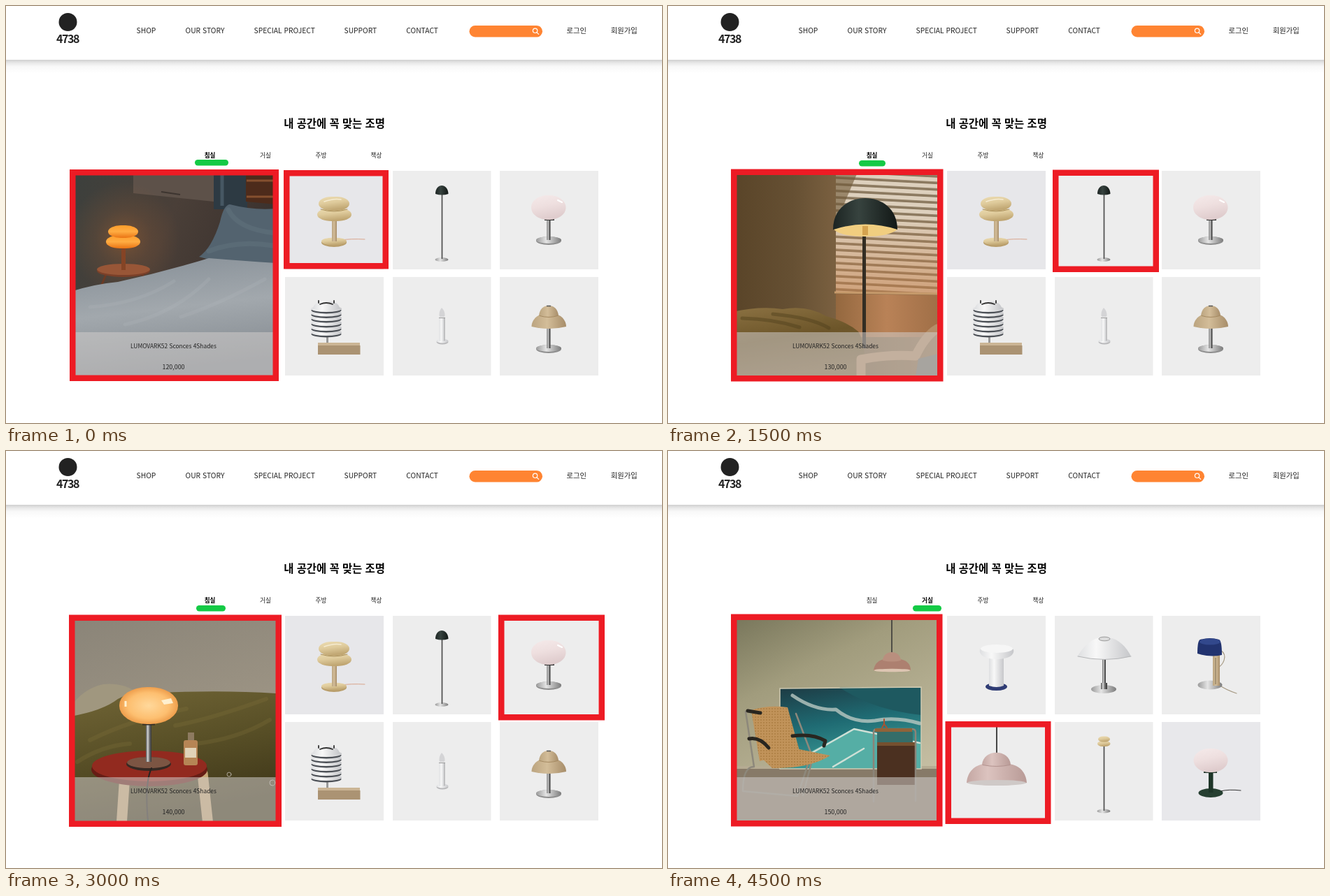
An HTML page for the animation above (6 s loop, 938 by 597 pixels).

```html
<!DOCTYPE html>
<html lang="ko">
<head>
<meta charset="utf-8">
<title>Lighting shop</title>
<style>
html, body { margin: 0; width: 100%; height: 100%; overflow: hidden; background: #fff; }
svg { display: block; width: 100%; height: 100%; }
text { font-family: "Noto Sans CJK KR", "Noto Sans CJK JP", "Noto Sans", sans-serif; fill: #222; }
.nav { font-size: 10.3px; }
.tab { font-size: 8.6px; text-anchor: middle; }
.tab.on { font-weight: 700; fill: #000; }
.mid { text-anchor: middle; }
.line { fill: none; stroke-linecap: round; stroke-linejoin: round; }
</style>
</head>
<body>
<svg viewBox="0 0 938 597">
<defs>
  <linearGradient id="shadow" x2="0" y2="1"><stop stop-color="#cfcfcf"/><stop offset=".25" stop-color="#e9e9e9"/><stop offset=".5" stop-color="#f8f8f8"/><stop offset="1" stop-color="#fff"/></linearGradient>
  <linearGradient id="cream" x2=".3" y2="1"><stop stop-color="#ecdcb2"/><stop offset=".5" stop-color="#dfcb9c"/><stop offset="1" stop-color="#c0a672"/></linearGradient>
  <linearGradient id="white"><stop stop-color="#dedfe1"/><stop offset=".35" stop-color="#f8f8f8"/><stop offset="1" stop-color="#c6c7ca"/></linearGradient>
  <linearGradient id="chrome"><stop stop-color="#555"/><stop offset=".35" stop-color="#d8d8d8"/><stop offset=".6" stop-color="#777"/><stop offset="1" stop-color="#333"/></linearGradient>
  <linearGradient id="plate"><stop stop-color="#9a9a9a"/><stop offset=".4" stop-color="#e4e4e4"/><stop offset=".7" stop-color="#b0b0b0"/><stop offset="1" stop-color="#7c7c7c"/></linearGradient>
  <linearGradient id="pink" x2=".3" y2="1"><stop stop-color="#f5eaea"/><stop offset=".5" stop-color="#eedfdf"/><stop offset="1" stop-color="#dfcccd"/></linearGradient>
  <linearGradient id="rose"><stop stop-color="#c4a7a3"/><stop offset=".35" stop-color="#dcc3bf"/><stop offset="1" stop-color="#b89a96"/></linearGradient>
  <linearGradient id="beige"><stop stop-color="#bba47f"/><stop offset=".45" stop-color="#d3bd99"/><stop offset="1" stop-color="#a78d69"/></linearGradient>
  <linearGradient id="dark"><stop stop-color="#1c2422"/><stop offset=".4" stop-color="#37433f"/><stop offset="1" stop-color="#121816"/></linearGradient>
  <linearGradient id="amber" x2="0" y2="1"><stop stop-color="#ff9d2b"/><stop offset=".5" stop-color="#ffac42"/><stop offset="1" stop-color="#ea7414"/></linearGradient>
  <radialGradient id="glow"><stop stop-color="#e07a2c" stop-opacity=".32"/><stop offset=".5" stop-color="#d07030" stop-opacity=".12"/><stop offset="1" stop-color="#d07030" stop-opacity="0"/></radialGradient>
  <linearGradient id="night" x2="1" y2=".4"><stop stop-color="#3c403d"/><stop offset=".5" stop-color="#4a3f38"/><stop offset="1" stop-color="#382f2c"/></linearGradient>
  <linearGradient id="sheet" x2=".2" y2="1"><stop stop-color="#858e96"/><stop offset=".5" stop-color="#a2a8ad"/><stop offset="1" stop-color="#848a90"/></linearGradient>
  <linearGradient id="brown"><stop stop-color="#594428"/><stop offset=".3" stop-color="#665033"/><stop offset=".5" stop-color="#7a6040"/><stop offset="1" stop-color="#94734e"/></linearGradient>
  <linearGradient id="sill"><stop stop-color="#94683f"/><stop offset=".5" stop-color="#b98257"/><stop offset="1" stop-color="#a06f47"/></linearGradient>
  <linearGradient id="sunset" x2="0" y2="1"><stop offset=".35" stop-color="#c47c45" stop-opacity="0"/><stop offset="1" stop-color="#c47c45" stop-opacity=".55"/></linearGradient>
  <linearGradient id="khaki" x2=".3" y2="1"><stop stop-color="#8b7142"/><stop offset=".5" stop-color="#6c5529"/><stop offset="1" stop-color="#806841"/></linearGradient>
  <linearGradient id="olive" x2=".3" y2="1"><stop stop-color="#716536"/><stop offset=".5" stop-color="#595027"/><stop offset="1" stop-color="#3f3719"/></linearGradient>
  <linearGradient id="gray" x2=".3" y2="1"><stop stop-color="#8a8478"/><stop offset="1" stop-color="#a69c8a"/></linearGradient>
  <radialGradient id="lit"><stop stop-color="#ffd89b"/><stop offset=".7" stop-color="#fdbf70"/><stop offset="1" stop-color="#ef9f4d"/></radialGradient>
  <linearGradient id="sage" x2=".5" y2="1"><stop stop-color="#77755a"/><stop offset=".35" stop-color="#a19c7d"/><stop offset="1" stop-color="#c6bfa4"/></linearGradient>
  <linearGradient id="sea" x2=".3" y2="1"><stop stop-color="#1d3a43"/><stop offset=".5" stop-color="#1f6b73"/><stop offset="1" stop-color="#3c9c97"/></linearGradient>
  <pattern id="slats" width="20" height="9.400" patternUnits="userSpaceOnUse" patternTransform="skewY(3)"><rect width="20" height="9.400" fill="#ddd0bd"/><rect y="5.800" width="20" height="3.600" fill="#8b795f"/></pattern>
  <pattern id="wicker" width="4" height="4" patternUnits="userSpaceOnUse"><rect width="4" height="4" fill="#c1935a"/><rect width="2" height="2" fill="#b18348"/></pattern>
  <clipPath id="photo"><rect x="92" y="236" width="294" height="294"/></clipPath>
  <g id="stand"><ellipse cy="30" rx="18" ry="6" fill="#8d8d8d"/><ellipse cy="29" rx="18" ry="5" fill="url(#plate)"/><path d="M-2.500 0h5v29h-5z" fill="url(#chrome)"/></g>
  <g id="disc"><ellipse cx="458" cy="435.800" rx="21.500" ry="4.600" fill="#4c5056"/><ellipse cx="458" cy="433.500" rx="22" ry="4.600" fill="url(#white)"/></g>
</defs>

<!-- header -->
<rect y="77" width="938" height="19" fill="url(#shadow)"/>
<circle cx="88.500" cy="23" r="13" fill="#222"/>
<text class="mid" x="88" y="52.500" font-size="16" font-weight="700" letter-spacing="-1.500">4738</text>
<g class="nav">
  <text x="186.600" y="39.300">SHOP</text>
  <text x="256.500" y="39.300">OUR STORY</text>
  <text x="354.500" y="39.300">SPECIAL PROJECT</text>
  <text x="483.500" y="39.300">SUPPORT</text>
  <text x="572.300" y="39.300">CONTACT</text>
  <text x="801.500" y="39.300">로그인</text>
  <text x="864.800" y="39.300">회원가입</text>
</g>
<rect x="662.500" y="28" width="104.500" height="16.500" rx="8.200" fill="#ff8432"/>
<g class="line" stroke="#fff" stroke-width="1.200"><circle cx="756.600" cy="35.300" r="3.200"/><path d="M759 37.800l2.600 2.600"/></g>
<text class="mid" x="469.500" y="173.600" font-size="15.400" font-weight="700" style="fill:#000">내 공간에 꼭 맞는 조명</text>
<g id="tabs">
  <text class="tab" x="291.600" y="217.300">침실</text>
  <text class="tab" x="371" y="217.300">거실</text>
  <text class="tab" x="450.500" y="217.300">주방</text>
  <text class="tab" x="529.500" y="217.300">책상</text>
</g>
<rect id="pill" height="8.500" rx="4.200" fill="#14ca45"/>

<path d="M399 236h141v141h-141zM553 236h140.500v141h-140.500zM706 236h141v141h-141zM399 388h141v141h-141zM553 388h140.500v141h-140.500zM706 388h141v141h-141z" fill="#ededed"/>

<!-- bedroom lamps -->
<g data-on="012">
  <rect x="399" y="236" width="141" height="141" fill="#e7e7ea"/>
  <path class="line" d="M480 335q12-2 33-1" stroke="#d9a58c"/>
  <ellipse cx="469" cy="338.500" rx="18" ry="6.500" fill="#b99e6b"/><ellipse cx="469" cy="337" rx="18" ry="5.500" fill="url(#cream)"/>
  <path d="M466 303h7v34h-7z" fill="url(#beige)"/>
  <rect x="445" y="289" width="49" height="19" rx="21" ry="9.500" fill="url(#cream)"/>
  <rect x="447" y="273" width="44" height="20" rx="18" ry="10" fill="url(#cream)"/>
  <path class="line" d="M455 280q14-5 24-3" stroke="#f5ebd0" stroke-width="1.500"/>
  <path class="line" d="M450 291q19 6 38 0" stroke="#a98e58"/>

  <ellipse cx="623" cy="363" rx="9.500" ry="3" fill="url(#plate)"/>
  <path d="M623.500 268v94" stroke="#555" stroke-width="1.800"/>
  <path d="M614 269c0-16 18-16 18.500 0q-9 3-18.500 0z" fill="url(#dark)"/>

  <use href="#stand" x="776" y="306"/>
  <path d="M770 306h14" stroke="#333" stroke-width="2"/>
  <rect x="751" y="271" width="49.500" height="35" rx="24" ry="17" fill="url(#pink)"/>
  <path class="line" d="M789 278l6 3" stroke="#fff" stroke-width="2"/>

  <path d="M459.500 468v19" stroke="#999" stroke-width="3"/>
  <path d="M446 482h60v5h-60z" fill="#cbb595"/><path d="M446 486h60.500v13h-60.500z" fill="#ab9373"/>
  <use href="#disc" y="34"/><use href="#disc" y="27"/><use href="#disc" y="20"/><use href="#disc" y="13"/><use href="#disc" y="6.500"/><use href="#disc"/>
  <path d="M439 433q1-10 19-11 18 1 19 11-19 6-38 0z" fill="url(#white)"/>
  <path class="line" d="M449 427q9-4 18 0M447 422v3M469 422v3" stroke="#333" stroke-width="1.800"/>

  <ellipse cx="624" cy="481" rx="8.500" ry="3.500" fill="#b9b9bb"/><ellipse cx="624" cy="479.500" rx="8.500" ry="3" fill="url(#white)"/>
  <path d="M619.500 447h8v33h-8z" fill="url(#white)"/><path d="M627 447v32" stroke="#aaa"/>
  <path d="M620 445q-2-7 3-13 6 6 4 13z" fill="#d4d4d6"/><path d="M619 446.500h9" stroke="#999"/>

  <use href="#stand" x="776" y="461"/>
  <path d="M751.500 459c0-10 9-18 18-18h14c9 0 17.500 8 17.500 18q-24 6-49.500 0z" fill="url(#beige)"/>
  <path d="M762 443c2-19 26-19 28 0q-14 5-28 0z" fill="url(#beige)"/>
  <path class="line" d="M763 443.500q13 4 26 0" stroke="#a58a62"/>
  <path d="M773 429.500h6" stroke="#555" stroke-width="1.500"/>
</g>

<!-- living room lamps -->
<g data-on="3">
  <rect x="706" y="388" width="141" height="141" fill="#e8e8eb"/>
  <ellipse cx="469.500" cy="337.500" rx="15.500" ry="5.500" fill="#2f3c74"/>
  <path d="M459 294h21v42q-10 4-21 0z" fill="url(#white)"/>
  <path d="M446 284q24-14 48 0c2 9-9 14-24 14s-26-5-24-14z" fill="url(#white)"/>
  <ellipse cx="470" cy="283" rx="23" ry="6" fill="#f6f6f6"/>

  <ellipse cx="623" cy="341" rx="18" ry="6" fill="url(#plate)"/>
  <path d="M621 296h5v44h-5z" fill="url(#chrome)"/><path d="M619 332h9v9h-9z" fill="url(#chrome)"/>
  <path d="M585.500 294c8-14 20-25 32-27h13c13 2 25 13 31.500 27q-38 9-76.500 0z" fill="url(#white)"/>
  <path class="line" d="M586 294q38 9 76 0" stroke="#b5b6b8"/>
  <ellipse cx="624" cy="269" rx="8" ry="2.800" fill="#ddd" stroke="#999"/>

  <path class="line" d="M790 285c12 8 3 22-4 25M788 335q10 7 25 12" stroke="#a69a84" stroke-width="1.200"/>
  <ellipse cx="775" cy="335" rx="17.500" ry="6.500" fill="url(#plate)"/>
  <path d="M779 291h10v45h-10z" fill="url(#beige)"/><path d="M783 296v38" stroke="#7c6c55"/>
  <path d="M757 290q0-19 4-20 14-4 27 0 4 2 4 22-17 4-35-2z" fill="#22336f"/>
  <ellipse cx="775" cy="273" rx="15" ry="4.500" fill="#32488c"/>

  <path d="M470 388v45" stroke="#333" stroke-width="1.800"/>
  <path d="M427 475c1-16 12-26 26-27h34c14 1 25 11 26 27q-43 8-86 0z" fill="url(#rose)"/>
  <path d="M449 449c2-23 39-23 41 0q-20 5-41 0z" fill="url(#rose)"/>
  <path class="line" d="M450 449.500q20 4 39 0" stroke="#b2928e"/>
  <ellipse cx="470" cy="475" rx="42" ry="4" fill="#cfc9c7"/>

  <ellipse cx="623" cy="515.500" rx="9.500" ry="3" fill="url(#plate)"/>
  <path d="M623.500 422v93" stroke="#555" stroke-width="1.800"/>
  <rect x="614" y="415" width="18.500" height="8" rx="7" ry="4" fill="url(#cream)"/>
  <rect x="615" y="408.500" width="17" height="8" rx="7" ry="4" fill="url(#cream)"/>

  <path class="line" d="M790 487q12-3 29-1" stroke="#333"/>
  <ellipse cx="776" cy="489.500" rx="17.500" ry="6.500" fill="#263f31"/>
  <path d="M773 459h6.500v30h-6.500z" fill="#1e3528"/><path d="M766 460h19" stroke="#25392e" stroke-width="2"/>
  <rect x="751.500" y="426" width="49" height="34" rx="23" ry="17" fill="url(#pink)"/>
</g>

<!-- room pictures -->
<g clip-path="url(#photo)">
  <g data-on="0">
    <path d="M92 236h294v294h-294z" fill="url(#night)"/>
    <path d="M182 236h115v44l-115-12z" fill="#5d5149"/><path d="M222 266l27 4" stroke="#3d3530" stroke-width="2"/>
    <path d="M297 236h48v55h-48z" fill="#2d3a43"/><path d="M309 236v50" stroke="#465763" stroke-width="5"/>
    <path d="M343 236h43v48l-43-4z" fill="#4d2b1b"/><path d="M344 250h40M344 273h40" stroke="#85502f" stroke-width="3"/>
    <circle cx="168" cy="332" r="80" fill="url(#glow)"/>
    <path class="line" d="M143 384l-8 20M194 382l6 12" stroke="#6b3a24" stroke-width="3"/>
    <ellipse cx="168" cy="379" rx="38" ry="9" fill="#7a4029"/><ellipse cx="168" cy="377" rx="38" ry="8" fill="#985637"/>
    <path d="M165 345h6v33h-6z" fill="#854425"/>
    <rect x="143" y="328" width="49" height="19" rx="20" ry="9.500" fill="url(#amber)"/>
    <rect x="146" y="314" width="43" height="18" rx="18" ry="9" fill="url(#amber)"/>
    <path d="M276 359q18-12 30-50 5-24 14-25 35 9 66 6v84q-62-1-110-15z" fill="#53636f"/>
    <path class="line" d="M318 292q14 28 67 33M290 351q40-16 92-8" stroke="#687884" stroke-width="7" opacity=".35"/>
    <path d="M92 409q35-11 68-14 65-14 130-34 50 4 96 7v162h-294z" fill="url(#sheet)"/>
    <path class="line" d="M120 431q70-5 120-37M170 456q70-15 120-65M250 445q55-18 120-54" stroke="#b4babf" stroke-width="5" opacity=".2"/>
  </g>

  <g data-on="1">
    <path d="M92 236h294v294h-294z" fill="url(#brown)"/>
    <path d="M240 236h146v175l-146-2z" fill="url(#slats)"/>
    <path d="M240 236h146v175l-146-2z" fill="url(#sunset)"/>
    <path d="M240 236h32l-32 75z" fill="#6e5836" opacity=".6"/>
    <path d="M238 410l148 2" stroke="#c69a6b" stroke-width="3"/>
    <path d="M240 412l146 2v60h-146z" fill="url(#sill)"/>
    <path d="M92 438q40-9 72-4 35-6 62 10 30 8 46 22 8 10 13 64h-193z" fill="url(#khaki)"/>
    <path class="line" d="M106 447q45 1 82 13M150 441q55 5 80 20" stroke="#4f3e1c" stroke-width="5" opacity=".45"/>
    <path d="M278 325h5v165h-5z" fill="#332d23"/>
    <path d="M236 320c0-60 92-60 92 0q-46 8-92 0z" fill="url(#dark)"/>
    <path d="M237 320q45-15 91 0-12 10-46 10t-45-10z" fill="#f1ce80"/><path d="M278 315h8v13h-8z" fill="#d5a34f"/>
    <path class="line" d="M276 530v-24q42-8 78-5 14-29 31-39" stroke="#b58e68" stroke-width="13"/>
    <path d="M358 505l28-7v32h-32z" fill="#77736a"/>
  </g>

  <g data-on="2">
    <path d="M92 236h294v294h-294z" fill="url(#gray)"/>
    <path d="M92 367q18-27 47-33 27-3 46 10l-30 35h-63z" fill="#a0977f"/>
    <path d="M92 380q46-8 68-25 25-15 60-9 90-4 166 1v183h-294z" fill="url(#olive)"/>
    <path class="line" d="M120 414q60-30 138-45M242 393q50-9 130-38M272 419q60-7 105-34M102 445q35-23 75-26" stroke="#82753d" stroke-width="6" opacity=".25"/>
    <path class="line" d="M170 463l-5 75M281 461l8 75" stroke="#c7a777" stroke-width="15"/>
    <ellipse cx="205" cy="456" rx="83" ry="24" fill="#661d15"/><ellipse cx="205" cy="451" rx="82" ry="22" fill="#922a1f"/>
    <ellipse cx="204" cy="448" rx="32" ry="10" fill="#352923"/><ellipse cx="204" cy="446" rx="31" ry="8" fill="#7c5543"/>
    <path d="M200 388h8v57h-8z" fill="url(#chrome)"/><path d="M195 391h18" stroke="#332d26" stroke-width="3"/>
    <path class="line" d="M208 454q-10 22-5 76" stroke="#272320" stroke-width="2"/>
    <rect x="162" y="338" width="84" height="53" rx="40" ry="26" fill="url(#lit)"/>
    <path d="M222 357l14-3 3 7-13 2z" fill="#fff0cf"/><path d="M171 358v8" stroke="#fff0cf" stroke-width="3"/>
    <rect x="254" y="414" width="20" height="36" rx="3" fill="#b68555"/><rect x="260" y="403" width="9" height="11" fill="#8d7a60"/><path d="M256 425h16v14h-16z" fill="#e1d3b8"/>
    <g class="line" stroke="#aca498"><circle cx="319" cy="463" r="3"/><circle cx="381" cy="475" r="4"/></g>
  </g>

  <g data-on="3">
    <path d="M92 236h294v294h-294z" fill="url(#sage)"/>
    <path d="M92 455h294v75h-294z" fill="#877a68"/><path d="M92 453h294" stroke="#b5ab92" stroke-width="4"/>
    <path d="M160 340l202-2v117h-202z" fill="url(#sea)"/>
    <path d="M245 338h117v40q-72-8-117-40z" fill="#1e5960"/>
    <path d="M205 430l60-32 97 20v37h-160z" fill="#55aea5"/>
    <path class="line" d="M178 350q32 22 62 20 24 20 56 16 30-6 64 4" stroke="#b9c9c2" stroke-width="5" opacity=".8"/>
    <path class="line" d="M206 432l60-34 94 20M236 452l44-26" stroke="#cfe0d6" stroke-width="2.500"/>
    <path d="M160 340l202-2v117h-202z" fill="none" stroke="#cfcab2" stroke-width="1.500"/>
    <path d="M320 236v55" stroke="#333" stroke-width="1.500"/>
    <path d="M294 314c1-10 8-15 16-16h21c9 1 16 6 16 16q-27 4-53 0z" fill="#ad8070"/><path d="M307 300c1-16 25-16 26 0q-13 3-26 0z" fill="#b98f7e"/>
    <ellipse cx="320.500" cy="314" rx="26" ry="2.300" fill="#ddc5b2"/>
    <path class="line" d="M111 373l12 79q-16 0-16 35l78 7 16-48M183 376l24 63-14 54" stroke="#8d887b" stroke-width="2.500"/>
    <path d="M119 371q25-8 52-4l17 62-57 15z" fill="url(#wicker)"/><path d="M131 437l57-10 44 9q-30 19-83 18z" fill="url(#wicker)"/>
    <path class="line" d="M114 372l18 3M116 412q15-3 28 13M178 408q29-4 47 7l-2 7" stroke="#292620" stroke-width="5"/>
    <path d="M299 402h51v16h-51z" fill="#356d69"/>
    <path d="M299 417h54v61h-54z" fill="#4b3020"/><path d="M299 417h54v5h-54z" fill="#75502f"/>
    <path class="line" d="M294 502v-99q0-5 5-5h50q5 0 5 5v98" stroke="#8b8478" stroke-width="2.500"/>
    <path d="M296 397h53v5h-53z" fill="#916339"/><path class="line" d="M309 384v7l-3 5M309 391l4 5" stroke="#ab5230" stroke-width="2"/>
  </g>
  <path d="M92 467h294v63h-294z" fill="#d0cdca" opacity=".55"/>
</g>
<text class="mid" x="239.500" y="489.800" font-size="8.400">LUMOVARK52 Sconces 4Shades</text>
<text id="price" class="mid" x="239.500" y="520.300" font-size="8.900"></text>
<g fill="none" stroke="#ed1b24" stroke-width="8.500"><rect id="big"/><rect id="small"/></g>
</svg>
<script>
// pill: x, y, width; big and small: outer edges of the red frames
const steps = [
  { tab: 0, price: '120,000', pill: [270, 220, 48], big: [91, 234, 390, 537], small: [397, 235, 547, 376.5] },
  { tab: 0, price: '130,000', pill: [273, 221, 38], big: [90, 233.5, 393.5, 537.5], small: [550, 234.5, 702, 381] },
  { tab: 0, price: '140,000', pill: [272, 221, 42], big: [90, 234.5, 394, 538], small: [704, 234.5, 856, 385.5] },
  { tab: 1, price: '150,000', pill: [350, 221, 41], big: [90, 233.5, 392.5, 537.5], small: [396.5, 387, 547.5, 534] }
];
const line = 8.5;
const byId = id => document.getElementById(id);
const set = (id, attrs) => {
  for (const name in attrs) byId(id).setAttribute(name, attrs[name]);
};
const frame = (id, [x0, y0, x1, y1]) =>
  set(id, { x: x0 + line / 2, y: y0 + line / 2, width: x1 - x0 - line, height: y1 - y0 - line });

let shown = -1;
function show(i) {
  const { tab, price, pill: [x, y, width], big, small } = steps[i];
  document.querySelectorAll('[data-on]').forEach(g => {
    g.style.display = g.dataset.on.includes(i) ? '' : 'none';
  });
  [...byId('tabs').children].forEach((t, n) => t.classList.toggle('on', n === tab));
  byId('price').textContent = price;
  set('pill', { x, y, width });
  frame('big', big);
  frame('small', small);
}

const start = performance.now();
function tick() {
  const i = Math.floor((performance.now() - start) % 6000 / 1500);
  if (i !== shown) show(shown = i);
  requestAnimationFrame(tick);
}
tick();
</script>
</body>
</html>
```
